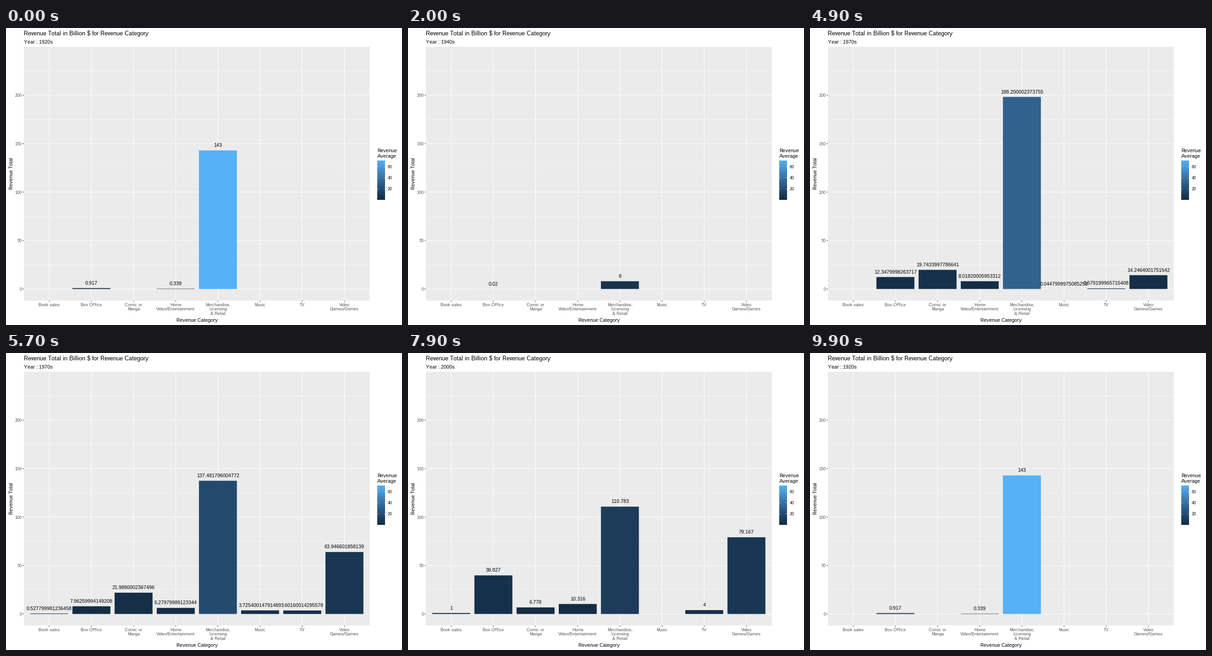
Write a matplotlib script that moves like this. It is 864x648 px and loops after 10000 ms.

```python
import numpy as np
import matplotlib.pyplot as plt
from matplotlib.animation import FuncAnimation
from matplotlib.patches import Rectangle

# Whole-pixel glyph advances, as on a screen device
plt.rcParams.update({"font.family": "Liberation Sans", "text.hinting": "native",
                     "text.hinting_factor": 1, "text.kerning_factor": 6})

W, H = 864, 648
LEFT, RIGHT, TOP, BOTTOM = 39.1, 793.6, 41, 594.6
ZERO, UNIT = 569.43, 2.1144
STEP = (RIGHT - LEFT) / 8.2
BAR = 0.9 * STEP
MAX_AVG = 71.5
STEPS = 5
SMALL, MEDIUM, LARGE = 9, 11, 13

CATEGORIES = ["Book sales", "Box Office", "Comic or\nManga",
              "Home\nVideo/Entertainment", "Merchandise,\nLicensing\n& Retail",
              "Music", "TV", "Video\nGames/Games"]
BOOK, BOX, COMIC, HOME, MERCH, MUSIC, TV, GAMES = range(8)


def fading(lead):
    """A decade led by merchandise, each next category 40 % of the one before."""
    return {c: round(lead * 0.4 ** k, 3)
            for k, c in enumerate((MERCH, BOX, HOME, BOOK, GAMES))}


def full(*totals):
    return dict(enumerate(totals))


DECADES = [
    {BOX: 0.917, HOME: 0.339, MERCH: 143},
    fading(31),
    {BOX: 0.02, MERCH: 8},
    fading(14),
    {BOX: 24, COMIC: 34.597, HOME: 4.023, MERCH: 38.9, MUSIC: 0.212, TV: 2.88, GAMES: 2.492},
    full(1, 9.435, 16.03, 9.017, 238.025, 0.003, 0.004, 17.185),
    full(0.213, 6.981, 25.96, 4.455, 70.453, 6.207, 6, 95.121),
    full(7.9, 25.068, 37.431, 11.443, 148.249, 9.613, 9, 90.692),
    {BOOK: 1, BOX: 39.827, COMIC: 6.778, HOME: 10.316, MERCH: 110.783, TV: 4, GAMES: 79.167},
    {BOX: 9.234, HOME: 1.82, MERCH: 26.5, GAMES: 18.825},
]


def average(total, category, decade):
    """Entries peak in the 1990s and thin out by 40 % per decade either side."""
    peak = 3 if category in (BOOK, MUSIC, TV) else 18
    return min(total / max(1, peak * 0.6 ** abs(decade - 7)), MAX_AVG)


def shade(avg):
    """Dark to light blue, bent slightly like a blend in Lab space."""
    low, high, sag = np.array([[19, 43, 67], [86, 177, 247], [1.5, 4, 5]])
    t = avg / MAX_AVG
    return (low + (high - low) * t - 4 * t * (1 - t) * sag) / 255


def y_of(value):
    return ZERO - value * UNIT


def x_of(index):
    return LEFT + (0.6 + index) * STEP


fig = plt.figure(figsize=(W / 72, H / 72), dpi=72, facecolor="white")
ax = fig.add_axes([0, 0, 1, 1])
ax.axis("off")


def text(x, y, s, size, color="black", ha="left", **kw):
    return ax.text(x, y, s, fontsize=size, color=color, ha=ha, va="baseline", **kw)


def line(x0, y0, x1, y1, color="white", lw=1.07):
    ax.plot([x0, x1], [y0, y1], color=color, lw=lw, solid_capstyle="butt",
            snap=False, zorder=1)


def box(x, y, w, h, color, zorder):
    return ax.add_patch(Rectangle((x, y), w, h, fc=color, lw=0, snap=False, zorder=zorder))


def draw_panel():
    box(LEFT, TOP, RIGHT - LEFT, BOTTOM - TOP, "#EBEBEB", 0)
    for v in range(25, 250, 50):
        line(LEFT, y_of(v), RIGHT, y_of(v), lw=0.53)
    for v in range(0, 250, 50):
        y = y_of(v)
        line(LEFT, y, RIGHT, y)
        line(LEFT - 2.75, y, LEFT, y, "#333333")
        text(34.5, y + 3.6, str(v), SMALL, "#4D4D4D", "right")
    for i, name in enumerate(CATEGORIES):
        x = x_of(i)
        line(x, TOP, x, BOTTOM)
        line(x, BOTTOM, x, BOTTOM + 2.75, "#333333")
        for row, part in enumerate(name.split("\n")):
            text(x, 607 + 9.5 * row, part, SMALL, "#4D4D4D", "center")


def draw_titles():
    text(39, 16, "Revenue Total in Billion $ for Revenue Category", LARGE)
    text(416.5, 641, "Revenue Category", MEDIUM, ha="center")
    text(15, 317.7, "Revenue Total", MEDIUM, ha="center", rotation=90,
         rotation_mode="anchor")


def draw_legend():
    x0, x1, top, bottom = 810, 827.3, 288.9, 375.3
    text(x0, 271, "Revenue", MEDIUM)
    text(x0, 283, "Average", MEDIUM)
    ramp = np.array([shade(a) for a in np.linspace(MAX_AVG, 0, 300)])
    ax.imshow(ramp[:, None, :], extent=(x0, 827, 375, 289), aspect="auto",
              interpolation="nearest", zorder=0)
    for v in (20, 40, 60):
        y = bottom - v / MAX_AVG * (bottom - top)
        line(x0, y, x0 + 3.4, y, lw=0.5)
        line(x1 - 3.4, y, x1, y, lw=0.5)
        text(833, y + 3.3, str(v), SMALL)


draw_panel()
draw_titles()
draw_legend()
ax.set_xlim(0, W)
ax.set_ylim(H, 0)

year = text(39, 34, "", MEDIUM)
bars = [box(x_of(i) - BAR / 2, ZERO, BAR, 0, "white", 2) for i in range(8)]
labels = [text(x_of(i), ZERO, "", MEDIUM, ha="center", zorder=3) for i in range(8)]


def timing(frame):
    """Current decade and the number of steps taken towards the next one."""
    for i in range(len(DECADES)):
        leave = int(6.45 + 9.9 * i)
        if frame < leave + STEPS - 1:
            return i, max(0, frame - leave + 1)
    return 0, 0


def update(frame):
    now, step = timing(frame)
    after = (now + 1) % len(DECADES)
    t = float(np.float32(step / STEPS))  # single precision gives the labels their long tails
    year.set_text(f"Year : {1920 + 10 * (after if step > 3 else now)}s")
    for i, (bar, label) in enumerate(zip(bars, labels)):
        start = DECADES[now].get(i)
        shown = start is not None
        bar.set_visible(shown)
        label.set_visible(shown)
        if not shown:
            continue
        # Bars without a successor keep their look until the next decade arrives
        goal = after if i in DECADES[after] else now
        end = DECADES[goal][i]
        total = start + (end - start) * t
        avg0, avg1 = average(start, i, now), average(end, i, goal)
        y = y_of(total)
        bar.set_y(y)
        bar.set_height(ZERO - y)
        bar.set_facecolor(shade(avg0 + (avg1 - avg0) * t))
        label.set_y(y - 7.8)
        label.set_text(f"{total:.15g}")
    return [year, *bars, *labels]


anim = FuncAnimation(fig, update, frames=100, interval=100, repeat=True,
                     repeat_delay=0, blit=False)
plt.show()
```
